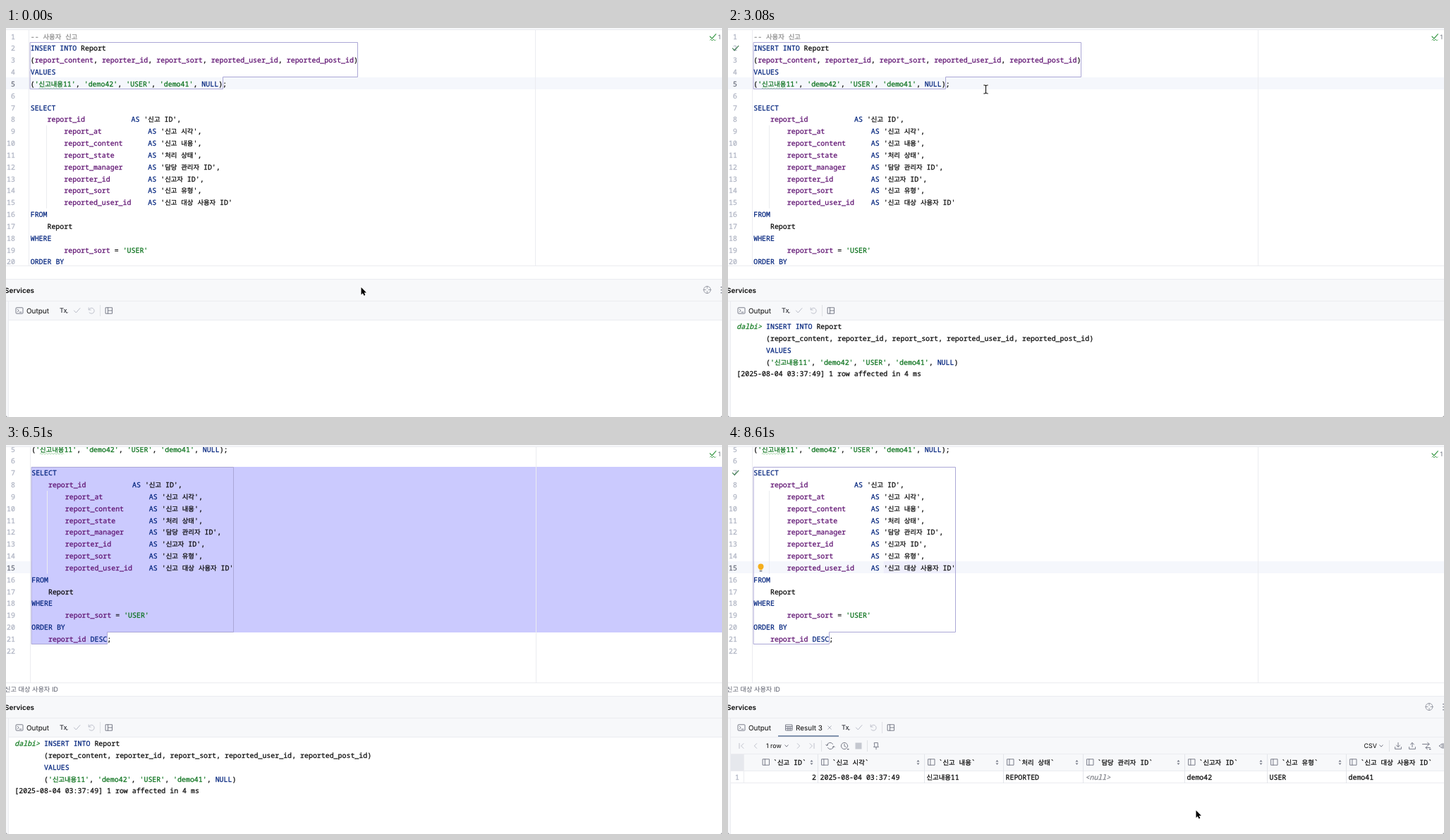
Write an HTML page with a canvas that moves like this. It is 1015x552 px and loops after 8960 ms.

```html
<!DOCTYPE html>
<html lang="ko">
<head>
<meta charset="utf-8">
<title>SQL console</title>
<style>
html, body { margin: 0; width: 100%; height: 100%; overflow: hidden; background: #fff; }
canvas { display: block; width: 1015px; height: 552px; }
</style>
</head>
<body>
<canvas id="stage"></canvas>
<script>
const W = 1015, H = 552, LOOP = 8960, STEP = 70;
const canvas = document.getElementById('stage');
const dpr = window.devicePixelRatio || 1;
canvas.width = W * dpr;
canvas.height = H * dpr;
const ctx = canvas.getContext('2d');
ctx.scale(dpr, dpr);
ctx.textRendering = 'geometricPrecision';

const SIZE = 9.92, CH = SIZE * 0.6, KO = 8.58, ROW = 16.83, TOP = 3.6;
const MONO = `${SIZE}px "Noto Sans Mono", "DejaVu Sans Mono", monospace`;
const HANGUL = `${KO / 0.92}px "Noto Sans CJK KR", "Noto Sans CJK", sans-serif`;
const UI = 'Inter, "Noto Sans CJK KR", sans-serif';
const C = {
  text: '#080808', key: '#00237d', col: '#5e1070', str: '#08701a', note: '#8c8c8c',
  num: '#aeb3c2', numOn: '#676b7a', line: '#ebecf0', panel: '#f7f8fa', row: '#f5f7fc',
  sel: '#cbcafe', box: '#aba7d6', icon: '#6c707e', off: '#b9bcc7', ok: '#3f9c4c'
};

const INSERT = [
  'INSERT INTO Report',
  '(report_content, reporter_id, report_sort, reported_user_id, reported_post_id)',
  'VALUES',
  "('신고내용11', 'demo42', 'USER', 'demo41', NULL)"
];
const alias = (name, label, pad = 8, end = ',') =>
  ' '.repeat(pad) + name.padEnd(20) + `AS '${label}'${end}`;
const CODE = [
  '-- 사용자 신고',
  ...INSERT.slice(0, 3), INSERT[3] + ';', '',
  'SELECT',
  alias('report_id', '신고 ID', 4),
  alias('report_at', '신고 시각'),
  alias('report_content', '신고 내용'),
  alias('report_state', '처리 상태'),
  alias('report_manager', '담당 관리자 ID'),
  alias('reporter_id', '신고자 ID'),
  alias('report_sort', '신고 유형'),
  alias('reported_user_id', '신고 대상 사용자 ID', 8, ''),
  'FROM', '    Report', 'WHERE', "        report_sort = 'USER'",
  'ORDER BY', '    report_id DESC;', ''
];
// left edge, heading, value
const COLUMNS = [
  [44, '신고 ID', ''], [127.5, '신고 시각', '2025-08-04 03:37:49'],
  [278.5, '신고 내용', '신고내용11'], [390.5, '처리 상태', 'REPORTED'],
  [503.5, '담당 관리자 ID', '<null>'], [647.5, '신고자 ID', 'demo42'],
  [764.5, '신고 유형', 'USER'], [876.5, '신고 대상 사용자 ID', 'demo41']
];

const within = (t, ...spans) => spans.some(([a, b]) => t >= a && t < b);

function track(keys, t) {
  if (t <= keys[0][0]) return keys[0].slice(1);
  for (let i = 1; i < keys.length; i++) {
    const a = keys[i - 1], b = keys[i];
    if (t < b[0]) {
      const u = (t - a[0]) / (b[0] - a[0]), e = u * u * (3 - 2 * u);
      return a.slice(1).map((v, k) => v + (b[k + 1] - v) * e);
    }
  }
  return keys[keys.length - 1].slice(1);
}

function rect(x, y, w, h, color) {
  ctx.fillStyle = color;
  ctx.fillRect(x, y, w, h);
}

function path(d, color, x = 0, y = 0, width = 0.9) {
  ctx.save();
  ctx.translate(x, y);
  ctx.strokeStyle = color;
  ctx.lineWidth = width;
  ctx.lineCap = ctx.lineJoin = 'round';
  ctx.stroke(new Path2D(d));
  ctx.restore();
}

function label(s, x, mid, color = C.text, size = 9.94, weight = 400, align = 'left') {
  ctx.font = `${weight} ${size}px ${UI}`;
  ctx.fillStyle = color;
  ctx.textAlign = align;
  ctx.fillText(s, x, mid + size * 0.36);
  ctx.textAlign = 'left';
}

const isKo = s => /[가-힣]/.test(s);
const widthOf = s => [...s].reduce((w, c) => w + (isKo(c) ? KO : CH), 0);

// Code text, slightly thickened by a hairline stroke.
function mono(s, x, mid, color, style = '') {
  ctx.fillStyle = ctx.strokeStyle = color;
  ctx.lineWidth = 0.25;
  ctx.lineJoin = 'round';
  for (const run of s.match(/[가-힣]+|[^가-힣]+/g) || []) {
    ctx.font = `${style} ${isKo(run) ? HANGUL : MONO}`;
    ctx.fillText(run, x, mid + 3.6);
    ctx.strokeText(run, x, mid + 3.6);
    x += widthOf(run);
  }
  return x;
}

function sql(s, x, mid, colColor) {
  for (const tok of s.split(/(--.*|'[^']*'|\b[A-Z]{2,}\b|[a-z]+_\w+)/)) {
    let color = C.text;
    if (/^--/.test(tok)) color = C.note;
    else if (/^'/.test(tok)) color = isKo(tok) && !/\d/.test(tok) ? C.text : C.str;
    else if (/^[A-Z]{2,}$/.test(tok)) color = C.key;
    else if (/^[a-z]+_/.test(tok)) color = colColor;
    x = mono(tok, x, mid, color);
  }
}

function check(x, y, color = C.ok, width = 1.4) {
  path('M-4 0 L-1.2 3 L4.4 -3.4', color, x, y, width);
}

function statementBox(x, top, first, last, tailEnd, right) {
  const snap = v => Math.floor(v) + 0.5;
  const y = n => top + (n - 1) * ROW;
  const l = snap(x);
  path(`M${l} ${snap(y(first))}H${snap(right)}V${snap(y(last) - 1.2)}H${snap(tailEnd)}V${snap(y(last + 1) - 1.2)}H${l}Z`,
    C.box, 0, 0, 1);
}

function bulb(x, y) {
  ctx.fillStyle = '#f5ae1c';
  ctx.beginPath();
  ctx.arc(x, y - 1.8, 4, 0, 7);
  ctx.fill();
  rect(x - 2, y + 1, 4, 2, '#f5ae1c');
  rect(x - 1.8, y + 3.8, 3.6, 1.4, '#6c707e');
}

function editor(t) {
  const ran = t >= 2450;
  const x = ran ? 36.2 : 34.7;
  const [scroll] = track([[5250, 0], [5320, 8], [5390, 30], [5460, 55], [5530, 70.2], [5600, 73.3]], t);
  const top = TOP - scroll;
  const mid = n => top + (n - 0.5) * ROW;
  const cur = t < 3850 ? 5 : 15;
  const second = t >= 4340;
  const picked = within(t, [1750, 2310], [6510, 7000]);

  ctx.save();
  ctx.beginPath();
  ctx.rect(0, 3, W, 334);
  ctx.clip();
  const rowTop = Math.floor(mid(cur) - ROW / 2);
  rect(0, rowTop, W, 17, C.row);

  const first = second ? 7 : 2, last = second ? 21 : 5;
  const tail = x + widthOf(CODE[last - 1].slice(0, -1));
  const right = x + widthOf(CODE[second ? 14 : 2]);
  if (picked) {
    const edge = n => Math.floor(top + (n - 1) * ROW);
    const a = edge(first), b = edge(last), c = edge(last + 1);
    rect(x, a, W - x, b - a, C.sel);
    rect(x, b, tail - x, c - b, C.sel);
  } else if (second) {
    const from = x + 31 * CH;
    rect(from, rowTop, right - from, 17, '#eeeefb');
  }

  rect(ran ? 34 : 32, 3, 1, 334, C.line);
  rect(ran ? 751 : 750, 3, 1, 334, C.line);
  rect(Math.round(x + 22), mid(9) - ROW / 2, 1, ROW * 7, C.line);
  statementBox(x, top, first, last, tail, right);

  CODE.forEach((s, i) => {
    const n = i + 1, y = mid(n);
    const no = String(n);
    mono(no, 13 - no.length * CH, y, n === cur ? C.numOn : C.num);
    sql(s, x, y, C.col);
  });

  let wave = `M${x + 2 * CH} 0`;
  for (let i = 0; i < 17; i++) wave += `q1 ${i % 2 ? 1.6 : -1.6} 2 0`;
  path(wave, '#7fc184', 0, mid(5) + 6.4, 0.7);

  const gutterCheck = n => check(10.5, mid(n), '#3f7d50', 1.2);
  if (ran) gutterCheck(2);
  if (t >= 7070) gutterCheck(7);
  if (within(t, [4830, 6510], [7070, LOOP])) bulb(46.5, mid(15));

  const caretOn = within(t, [1680, 1750], [2310, 2800], [3290, 3780], [3850, 4900],
    [5390, 5950], [7000, 7560], [8050, 8610]);
  if (caretOn) rect(x + widthOf(CODE[cur - 1]) - 0.2, mid(cur) - 7, 1.5, 14, '#000');
  ctx.restore();

  rect(0, 0, W, 2, C.panel);
  rect(0, 2, W, 1, C.line);
  check(1002, 12, C.ok, 1.2);
  path('M-4 0q1 -1.8 2 0t2 0t2 0t2 0', C.ok, 1002, 17, 0.9);
  label('1', 1009.5, 13, C.icon, 8.8);
  rect(0, 337, W, 1, C.line);
  if (t >= 4130) label('신고 대상 사용자 ID', 74, 347, '#5a5d6b', 9.2, 400, 'right');
}

function undo(x, y) {
  path('M-3.8 -4V-1H-0.8M-3.6 -1.2A4 4 0 1 1 -3 2.8', C.off, x, y);
}

function toolbar(hover, result) {
  rect(0, 356, W, 58, C.panel);
  rect(0, 414, 3, H - 414, C.panel);
  rect(0, 356, W, 1, C.line);
  rect(0, 387, W, 1, C.line);
  rect(3, 387, 1, H - 387, C.line);
  rect(3, 414, W, 1, C.line);
  label('Services', 40, 372, C.text, 9.94, 600, 'right');
  if (hover) {
    path('M5 0A5 5 0 1 1 -5 0A5 5 0 1 1 5 0M0 -5V-2M0 5V2M-5 0H-2M5 0H2', '#8e919c', 994, 371.5);
    for (const d of [-4, 0, 4]) rect(1013.3, 371 + d, 1.4, 1.4, C.icon);
  }
  path('M-5 -3.2Q-5 -4.2 -4 -4.2H4Q5 -4.2 5 -3.2V3.2Q5 4.2 4 4.2H-4Q-5 4.2 -5 3.2ZM-2.8 -2L-0.8 0L-2.8 2M0.2 2.2H2.8', C.icon, 19, 401);
  label('Output', 29, 401);
  const dx = result ? 85 : 0;
  if (result) {
    path('M-4.5 -4H4.5V4H-4.5ZM-4.5 -1.4H4.5M-4.5 1.4H4.5M-1.5 -1.4V4M1.5 -1.4V4', C.icon, 86.5, 401);
    label('Result 3', 96, 401);
    path('M-2.3 -2.3L2.3 2.3M2.3 -2.3L-2.3 2.3', '#a0a3af', 144, 401, 0.8);
    rect(71, 412, 86, 2, '#8193ae');
  }
  label('Tx', 76 + dx, 401, '#30323a', 9.2, 500);
  path('M-1 -0.5L0 0.7L1 -0.5', '#30323a', 86.3 + dx, 404, 0.9);
  check(100.5 + dx, 401, C.off, 1);
  undo(121 + dx, 401);
  rect(133 + dx, 393, 1, 16, '#dfe1e5');
  path('M-4.5 -4.2H4.5V4.2H-4.5ZM-1.5 -4.2V4.2M-1.5 0H4.5', C.icon, 146 + dx, 401);
}

function output() {
  mono('dalbi>', 12.3, 423.5, '#0f7a1e', 'italic');
  INSERT.forEach((s, i) => sql(s, 54, 423.5 + i * ROW, C.text));
  mono('[2025-08-04 03:37:49] 1 row affected in 4 ms', 12.3, 423.5 + 4 * ROW, C.text);
}

function resultGrid() {
  const y = 427;
  const chevron = 'M-2.2 -1.2L0 1.2L2.2 -1.2';
  rect(4, 415, W, 24, C.panel);
  path('M-3 -3.6V3.6M3 -3.4L-0.4 0L3 3.4', C.off, 19, y);
  path('M1.7 -3.4L-1.7 0L1.7 3.4', C.off, 39, y);
  label('1 row', 54, y, C.text, 8.9);
  path(chevron, C.icon, 83, y);
  path('M-1.7 -3.4L1.7 0L-1.7 3.4', C.off, 100, y);
  path('M3 -3.6V3.6M-3 -3.4L0.4 0L-3 3.4', C.off, 119, y);
  rect(132, 419, 1, 16, '#dfe1e5');
  path('M-4.8 -0.5A4.6 4.6 0 0 1 3.6 -2.6M4.8 0.5A4.6 4.6 0 0 1 -3.6 2.6M-6.3 -1.8L-4.8 -0.2L-3.2 -1.8M6.3 1.8L4.8 0.2L3.2 1.8', C.icon, 145, y);
  path('M4.6 0A4.6 4.6 0 1 1 -4.6 0A4.6 4.6 0 1 1 4.6 0M0 -2.6V0.3L2 1.5', C.icon, 165, y);
  rect(169, 431, 2.5, 1.3, C.icon);
  rect(180.5, 422.5, 9, 9, '#c4c7cf');
  rect(197, 419, 1, 16, '#dfe1e5');
  path('M-2.4 -4.4H2.4V0.2L3.4 1.6H-3.4L-2.4 0.2ZM0 1.6V4.8', C.icon, 210, y);
  label('CSV', 901.5, y, C.text, 8.9);
  path(chevron, C.icon, 926, y);
  rect(937, 419, 1, 16, '#dfe1e5');
  path('M0 -4.6V1.4M-2.5 -1L0 1.5L2.5 -1M-4.4 1.6V4.4H4.4V1.6', C.icon, 950, y);
  path('M0 1.6V-4.4M-2.5 -2L0 -4.5L2.5 -2M-4.4 1.6V4.4H4.4V1.6', C.icon, 970, y);
  path('M-5.5 -2.5H4M1.6 -5L4 -2.5L1.6 0M5.5 2.5H-1M1.4 0.2L-1 2.5L1.4 4.8', C.icon, 990, y);
  rect(994, 431, 2.5, 1.3, C.icon);
  path('M-5 0Q0 -6.4 5 0Q0 6.4 -5 0ZM1.5 0A1.5 1.5 0 1 1 -1.5 0A1.5 1.5 0 1 1 1.5 0', C.icon, 1013.5, y);

  rect(4, 438, W, 24, C.panel);
  rect(4, 439, 18, 23, '#e6e8ed');
  for (const ly of [438, 462, 479]) rect(4, ly, W, 1, C.line);
  rect(22, 439, 1, 41, C.line);
  COLUMNS.forEach(([x, name, value], i) => {
    if (i) rect(Math.floor(x), 439, 1, 41, '#e3e5ea');
    path('M-4.5 -4.2H4.5V4.2H-4.5ZM-1.6 -4.2V4.2', C.icon, x + 10, 450);
    mono('`' + name + '`', x + 20, 450.5, C.text);
    const next = COLUMNS[i + 1];
    if (next) {
      ctx.fillStyle = C.icon;
      ctx.fill(new Path2D(`M${next[0] - 11} 449.4l2 -2.4l2 2.4zM${next[0] - 11} 451.4l2 2.4l2 -2.4z`));
    }
    const isNull = value === '<null>';
    mono(value, x + 3, 471, isNull ? '#7d7f86' : C.text, isNull ? 'italic' : '');
  });
  mono('2', 119, 471, C.text);
  mono('1', 10, 471, C.num);
}

function arrow(x, y) {
  const p = new Path2D(`M${x} ${y}v10.4l2.4 -2.2l1.6 3.6l1.8 -0.8l-1.6 -3.5h3.2z`);
  ctx.lineJoin = 'round';
  ctx.strokeStyle = '#fff';
  ctx.lineWidth = 1.8;
  ctx.stroke(p);
  ctx.fillStyle = '#000';
  ctx.fill(p);
}

function iBeam(x, y) {
  const d = 'M-2.8 -6Q0 -6 0 -4.6Q0 -6 2.8 -6M0 -4.6V4.6M-2.8 6Q0 6 0 4.6Q0 6 2.8 6';
  path(d, '#fff', x, y, 2.4);
  path(d, '#111', x, y, 1.1);
}

const MOUSE = [
  [0, 503.5, 368], [840, 365.5, 67], [910, 365.5, 74], [980, 365.5, 75], [1120, 366, 78.5],
  [3010, 366, 78.5], [3080, 365.5, 87], [3570, 361, 243], [3780, 361, 243], [3990, 352, 241],
  [7770, 352, 241], [8330, 662.5, 517.5], [8400, 662.5, 517.5], [8470, 663.5, 518.5]
];

function draw(t) {
  const [mx, my] = track(MOUSE, t);
  const result = t >= 7840;
  rect(0, 0, W, H, '#fff');
  editor(t);
  toolbar(my > 356, result);
  if (result) resultGrid();
  else if (t >= 2450) output();
  ctx.fillStyle = '#8a8c92';
  ctx.fill(new Path2D(`M0 ${H - 3}Q0 ${H} 3 ${H}H0ZM${W} ${H - 3}Q${W} ${H} ${W - 3} ${H}H${W}Z`));
  if (!within(t, [1750, 3080], [6510, 7840])) {
    if (my > 337 || within(t, [1680, 1750])) arrow(mx, my);
    else iBeam(mx, my);
  }
}

const start = performance.now();
function frame() {
  const t = (performance.now() - start) % LOOP;
  draw(Math.floor(t / STEP) * STEP);
  requestAnimationFrame(frame);
}
frame();
</script>
</body>
</html>
```
